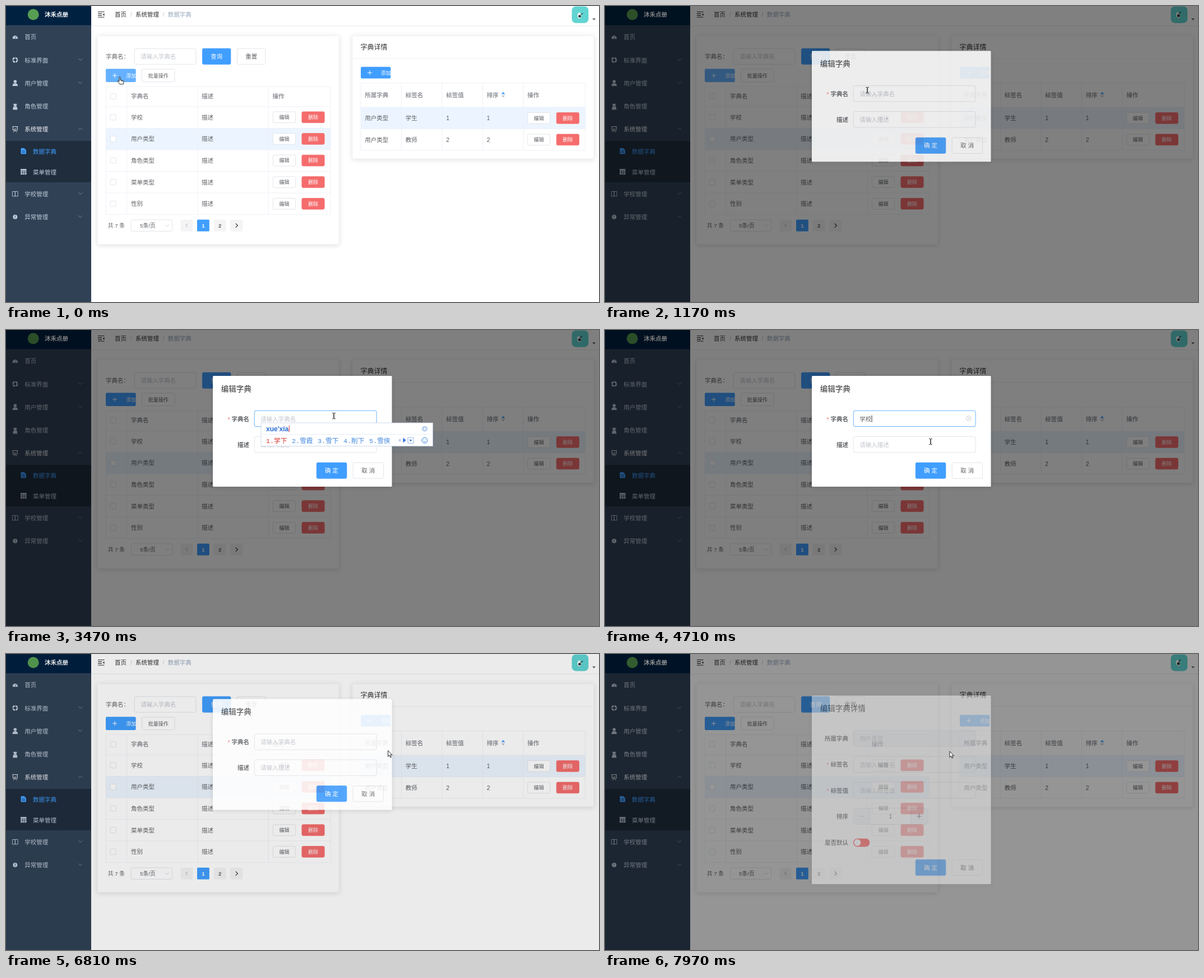
Animation, 1058 px wide and 529 px high, one loop 8 s. Source, as an HTML page:

```html
<!DOCTYPE html>
<html lang="zh-CN">
<head>
<meta charset="utf-8">
<style>
html, body { margin: 0; width: 100%; height: 100%; overflow: hidden; background: #fff; }
svg { display: block; width: 100vw; height: 100vh; }
text { font-family: "Liberation Sans", "Noto Sans CJK SC", "Noto Sans CJK", sans-serif; white-space: pre; }
</style>
</head>
<body>
<svg id="stage" viewBox="0 0 1058 529">
  <defs>
    <filter id="soft" x="-10%" y="-10%" width="120%" height="125%">
      <feDropShadow dx="0" dy="1.5" stdDeviation="4" flood-color="#000" flood-opacity=".13"/>
    </filter>
  </defs>
</svg>
<script>
const LOOP = 8000;
const BLUE = '#409eff', LIGHT = '#66b1ff', RED = '#f56c6c', LINE = '#ebeef5', EDGE = '#dcdfe6';
const INK = '#606266', DARK = '#303133', GREY = '#909399', HINT = '#c0c4cc', MENU = '#bfcbd9';

// Markup helpers; text is placed by its vertical centre.
const text = (x, cy, s, o = {}) => {
  const { size = 10.5, fill = INK, bold, mid, id, extra = '' } = o;
  return `<text x="${x}" y="${(cy + size * .375).toFixed(2)}" font-size="${size}" fill="${fill}"` +
    `${bold ? ' font-weight="700"' : ''}${mid ? ' text-anchor="middle"' : ''}${id ? ` id="${id}"` : ''} ${extra}>${s}</text>`;
};
const rect = (x, y, w, h, fill, o = {}) =>
  `<rect x="${x}" y="${y}" width="${w}" height="${h}" fill="${fill}" rx="${o.r || 0}"` +
  `${o.stroke ? ` stroke="${o.stroke}" stroke-width="${o.sw || .8}"` : ''}${o.id ? ` id="${o.id}"` : ''} ${o.extra || ''}/>`;
const path = (d, stroke, o = {}) =>
  `<path d="${d}" fill="${o.fill || 'none'}" stroke="${stroke}" stroke-width="${o.w || 1}" ${o.extra || ''}/>`;
const group = (id, body, attr = '') => `<g id="${id}" ${attr}>${body}</g>`;

const button = (x, y, w, h, label, o = {}) => {
  const { fill = '#fff', size = 9, id } = o;
  const plain = fill === '#fff';
  return rect(x + .4, y + .4, w - .8, h - .8, fill, { r: 2.3, stroke: plain ? EDGE : fill, id }) +
    text(x + w / 2, y + h / 2, label, { size, fill: plain ? INK : '#fff', mid: true, id: id && id + 'Text' });
};
const addButton = (x, y, w, h, id) =>
  rect(x, y, w, h, BLUE, { r: 2.3, id }) +
  path(`M${x + 12} ${y + h / 2}h8m-4 -4v8`, '#fff') +
  text(x + w - 30 + (w < 54 ? .5 : 0) + 18, y + h / 2, '添加', { size: 9, fill: '#fff', extra: 'text-anchor="middle" dx="3"' });
const field = (x, y, w, h, hint, o = {}) =>
  rect(x + .4, y + .4, w - .8, h - .8, o.fill || '#fff', { r: 3, stroke: EDGE, id: o.id }) +
  text(x + 11.5, y + h / 2 + .4, hint, { fill: HINT, id: o.id && o.id + 'Text' });
const rowButtons = (x, cy) =>
  button(x, cy - 10.3, 41, 20.6, '编辑') + button(x + 51.5, cy - 10.3, 41, 20.6, '删除', { fill: RED });
const chevron = (x, y, up, color = GREY) =>
  path(up ? `M${x - 3.5} ${y + 1.8}l3.5 -3.5l3.5 3.5` : `M${x - 3.5} ${y - 1.8}l3.5 3.5l3.5 -3.5`, color, { w: .8 });
const checkbox = cy => rect(186.2, cy - 5, 10, 10, '#fff', { r: 1.3, stroke: EDGE });
const grid = (xs, ys) => path(
  xs.map(x => `M${x} ${ys[0]}V${ys[ys.length - 1]}`).join('') +
  ys.map(y => `M${xs[0]} ${y}H${xs[xs.length - 1]}`).join(''), LINE, { w: .8 });

function sidebar() {
  const icons = [
    path('M11.5 59a5 5 0 1 1 9.6 0zM16 58l2-4', '#304156', { fill: MENU, w: .8 }),
    `<circle cx="16.3" cy="96.5" r="3.8" fill="none" stroke="${MENU}" stroke-width="2.6" stroke-dasharray="4.6 1.37"/>`,
    `<circle cx="16.3" cy="135" r="2.8" fill="${MENU}"/>` + path('M11.5 143q0 -5 4.8 -5t4.8 5z', 'none', { fill: MENU }),
    `<circle cx="16.3" cy="177" r="2.6" fill="${MENU}"/>` + path('M12.5 185l1 -5h5.6l1 5zM12.5 175.5h7.6', MENU, { fill: MENU, w: .8 }),
    path('M11.5 215.5h9.6M12.3 215.5v6.5h8v-6.5M13 225.5l3.3 -3l3.3 3M14 219.5l1.7 1.2l2.8 -2.7', '#f4f4f5', { w: .9 }),
    path('M27 254.5h5.5l3 3v6.5h-8.5z', BLUE, { fill: BLUE }) + path('M28.5 259h5.5m-5.5 2.5h5.5', '#1f2d3d', { w: .8 }),
    rect(26, 291.3, 10.5, 10, MENU) + path('M26 294.8h10.5m-10.5 3.2h10.5M29.5 295v6.3m3.5 -6.3v6.3', '#1f2d3d', { w: .8 }),
    path('M11.5 331.5h4.8v8.5h-4.8zM16.3 331.5h4.8v8.5h-4.8z', MENU, { w: .9 }),
    `<circle cx="16.3" cy="377" r="4" fill="${MENU}"/>` + path('M16.3 374.5v3m0 1v1', '#304156')
  ];
  const items = [['首页', 55.3], ['标准界面', 96.7, 1], ['用户管理', 138, 1], ['角色管理', 179.3], ['系统管理', 220.5, 2],
    ['数据字典', 259.8], ['菜单管理', 296.7], ['学校管理', 336, 1], ['异常管理', 377.3, 1]];
  return rect(0, 0, 152, 529, '#304156') + rect(0, 0, 152, 34.3, '#002140') + rect(0, 241, 152, 74, '#1f2d3d') +
    '<circle cx="48.7" cy="15.3" r="10" fill="#579d52"/>' +
    text(69, 15.3, '沐禾点册', { fill: '#fff', bold: true }) + icons.join('') +
    items.map(([s, y, arrow], i) =>
      text(i === 5 || i === 6 ? 48 : 33.3, y, s, { fill: i === 4 ? '#f4f4f5' : i === 5 ? BLUE : MENU }) +
      (arrow ? chevron(132.7, y - 1, arrow === 2) : '')).join('');
}

function topbar() {
  return rect(152, 35, 906, 1, '#ebecef') +
    path('M164 10.5h11.5m-11.5 3.2h7m-7 3.2h7m-7 3.1h11.5', DARK, { w: 1.2 }) + path('M175.5 13l-3 2.3l3 2.3z', 'none', { fill: DARK }) +
    text(194, 15.3, '首页', { fill: DARK }) + text(222, 15.3, '/', { fill: HINT }) +
    text(231, 15.3, '系统管理', { fill: DARK }) + text(279.5, 15.3, '/', { fill: HINT }) +
    text(288.7, 15.3, '数据字典', { fill: '#97a8be' }) +
    rect(1009.5, .7, 29.7, 29.7, '#61d5d2', { r: 7 }) +
    group('pet', '<ellipse cx="1023" cy="17" rx="3.4" ry="5.4" fill="#f4f8f6"/><circle cx="1023.5" cy="18.3" r="2.4" fill="#26343a"/>' +
      path('M1025 15.5l4.5 -2.5', '#26343a', { w: 1.3 })) +
    path('M1046 22.3h6l-3 3.2z', 'none', { fill: '#5a5e66' });
}

function leftCard() {
  const ys = [144, 180, 218.5, 257, 295.5, 334, 372.7], xs = [178.3, 215.5, 342, 468.3, 579];
  const names = ['学校', '用户类型', '角色类型', '菜单类型', '性别'];
  const head = { fill: GREY, bold: true };
  return rect(163, 53.3, 431, 372.7, '#fff', { r: 2, stroke: LINE, extra: 'filter="url(#soft)"' }) +
    text(178, 90, '字典名：') + field(228.7, 75.6, 110.6, 29, '请输入字典名') +
    button(350, 75.6, 51.3, 29, '查询', { fill: BLUE, size: 10.5 }) + button(412, 75.6, 51.3, 29, '重置', { size: 10.5 }) +
    addButton(178, 112.3, 53.7, 23.7, 'addLeft') + button(242, 112.3, 59.3, 23.7, '批量操作') +
    rect(178.3, 218.5, 400.7, 38.5, '#ecf5ff') + grid(xs, ys) + checkbox(161.3) +
    text(223, 161.3, '字典名', head) + text(349, 161.3, '描述', head) + text(475.5, 161.3, '操作', head) +
    names.map((s, i) => {
      const y = 198.8 + i * 38.65;
      return checkbox(y) + text(223, y, s) + text(349, y, '描述') + rowButtons(476, y);
    }).join('') +
    text(181.7, 392.3, '共 7 条', { size: 9.75 }) +
    rect(223.2, 382, 73.5, 20.5, '#fff', { r: 2.3, stroke: EDGE }) + text(239, 392.3, '5条/页', { size: 9.75 }) + chevron(287.5, 392.3, false, HINT) +
    [311.5, 341, 370.7, 400.3].map((x, i) => rect(x, 381.7, 21.8, 21, i === 1 ? BLUE : '#f4f4f5', { r: 1.5 })).join('') +
    text(351.9, 392.3, '1', { size: 9.75, fill: '#fff', bold: true, mid: true }) +
    text(381.6, 392.3, '2', { size: 9.75, bold: true, mid: true }) +
    path('M324 389l-3.3 3.3l3.3 3.3', HINT, { w: 1.1 }) + path('M409.7 388.7l3.6 3.6l-3.6 3.6', DARK, { w: 1.2 });
}

function rightCard() {
  const xs = [633, 705.5, 778, 850.5, 923, 1033.5], heads = ['所属字典', '标签名', '标签值', '排序', '操作'];
  const rows = [['用户类型', '学生', '1', '1'], ['用户类型', '教师', '2', '2']];
  return rect(618, 53.3, 431, 219.7, '#fff', { r: 2, stroke: LINE, extra: 'filter="url(#soft)"' }) +
    text(632.5, 73.7, '字典详情', { size: 12, fill: DARK }) + rect(618, 93.5, 431, .8, LINE) +
    addButton(633, 108.8, 53.3, 20.7, 'addRight') +
    rect(633, 181, 400.5, 38.5, '#ecf5ff') + grid(xs, [137.5, 181, 219.5, 258]) +
    heads.map((s, i) => text(xs[i] + 7.3, 159.3, s, { fill: GREY, bold: true })).join('') +
    path('M883.5 157.5h7l-3.5 -3.8z', 'none', { fill: BLUE }) + path('M883.5 159.7h7l-3.5 3.8z', 'none', { fill: HINT }) +
    rows.map((row, r) => row.map((s, i) => text(xs[i] + 7.3, 200.3 + r * 38.6, s)).join('') + rowButtons(930.3, 200.3 + r * 38.6)).join('');
}

const label = (cy, s, need) => {
  const x = 434 - s.length * 10.5;
  return text(x, cy, s, { bold: true }) + (need ? text(x - 7, cy + 1, '*', { fill: RED }) : '');
};
const frame = (h, title, okY, id) =>
  rect(369, 82, 319.5, h, '#fff', { r: 1.5, extra: 'filter="url(#soft)"' }) +
  text(383.7, 104.7, title, { size: 13.5, fill: DARK }) +
  button(553.8, okY, 54.5, 29, '确 定', { fill: BLUE, size: 10.5, id: id + 'Ok' }) +
  button(618.8, okY, 55, 29, '取 消', { size: 10.5, id: id + 'No' });
const clearIcon = (id, y) => group(id, `<circle cx="648.8" cy="${y}" r="4.3" fill="none" stroke="${HINT}" stroke-width=".9"/>` +
  path(`M647.2 ${y - 1.6}l3.2 3.2m0 -3.2l-3.2 3.2`, HINT, { w: .9 }));

function editDialog() {
  return frame(198, '编辑字典', 236.7, 'edit') +
    label(158.7, '字典名', true) + field(442.8, 143.7, 218.7, 29.3, '请输入字典名', { id: 'name' }) + clearIcon('nameClear', 158) +
    text(443, 181.3, '字典名学校已存在', { size: 9, fill: RED, id: 'error' }) +
    label(204.7, '描述') + field(442.8, 190, 218.7, 29.3, '请输入描述', { id: 'desc' }) + clearIcon('descClear', 204.5) +
    rect(0, 0, .9, 12, '#222', { id: 'caret' });
}

function detailDialog() {
  return frame(337, '编辑字典详情', 375, 'detail') +
    label(159, '所属字典') + field(442.8, 144, 218.7, 29.3, '用户类型', { fill: '#f5f7fa' }) +
    label(205.2, '标签名', true) + field(442.8, 190.5, 218.7, 29.3, '请输入标签名') +
    label(251.4, '标签值', true) + field(442.8, 236.8, 218.7, 29.3, '请输入标签值') +
    label(297.8, '排序') + rect(443.2, 283.3, 132.5, 29, '#fff', { r: 3, stroke: EDGE }) +
    rect(443.6, 283.7, 29.5, 28.2, '#f5f7fa') + rect(545.5, 283.7, 29.8, 28.2, '#f5f7fa') +
    path('M473.2 283.5v28.6M545.5 283.5v28.6', EDGE, { w: .8 }) +
    path('M454 297.8h8', HINT) + path('M556.3 297.8h8.4m-4.2 -4.2v8.4', INK) + text(509.3, 297.8, '1', { mid: true }) +
    label(344.6, '是否默认') + rect(442.8, 337.5, 29.6, 14.8, '#ff4949', { r: 7.4 }) + '<circle cx="450.3" cy="344.9" r="6" fill="#fff"/>';
}

function imePanel() {
  return rect(455, 166, 306.5, 41.5, '#fff', { stroke: '#c5d3e6' }) + rect(455.4, 186, 305.7, .8, '#e4eaf2') +
    text(464, 176.5, '', { size: 12, fill: '#2a6fd6', bold: true, id: 'pinyin' }) +
    rect(0, 170.5, 1, 12, '#d33', { id: 'imeCaret' }) +
    `<circle cx="747" cy="176.5" r="3.2" fill="none" stroke="#a9c6ee" stroke-width="2"/>` +
    `<circle cx="747" cy="176.5" r="4.6" fill="none" stroke="#a9c6ee" stroke-width="1.3" stroke-dasharray="1.8 1.81"/>` +
    [0, 1, 2, 3, 4].map(i => text(464 + i * 46, 197.3, '', { size: 11.7, fill: i ? '#3f86dd' : '#d9302c', id: 'word' + i, extra: 'font-weight="300" style="font-family:\'Liberation Mono\',\'Noto Sans CJK SC\',monospace"' })).join('') +
    path('M704 193.5v7l-4 -3.5z', 'none', { fill: '#b8cdea' }) + path('M708.5 192.5v9l5 -4.5z', 'none', { fill: '#2a6fd6' }) +
    rect(717, 192.3, 10, 10, '#fff', { stroke: '#7fabe6' }) + path('M719.5 196h5l-2.5 3z', 'none', { fill: '#2a6fd6' }) +
    '<circle cx="747" cy="197.3" r="5" fill="none" stroke="#3f86dd"/>' + path('M744.3 198.5q2.7 3 5.4 0M745 195v1.4m4 -1.4v1.4', '#3f86dd', { w: .9 });
}

const pointers =
  group('hand', path('M-1 .8q1 -1.3 2 0v5l5 1.2q1.2 .5 1 2l-.8 4.3h-6.2l-3.5 -5q-.3 -1.7 1.2 -1l1.3 1.2z', '#111', { fill: '#fff', w: .9 }) + path('M3 6.3v2m2 -1.5v1.8', '#111', { w: .7 })) +
  group('beam', path('M-2.8 -5.3q2.8 0 2.8 1.2v8.2q0 1.2 -2.8 1.2M2.8 -5.3q-2.8 0 -2.8 1.2v8.2q0 1.2 2.8 1.2', '#222', { w: 1 })) +
  group('arrow', path('M0 0v10.5l2.4 -2.2l1.8 4l1.7 -.8l-1.8 -3.8h3.4z', '#111', { fill: '#fff', w: .9 }));

const stage = document.getElementById('stage');
stage.insertAdjacentHTML('beforeend',
  rect(0, 0, 1058, 529, '#fff') + leftCard() + rightCard() + topbar() + sidebar() +
  rect(0, 0, 1058, 529, '#000', { id: 'shade' }) +
  group('edit', editDialog()) + group('detail', detailDialog()) + group('ime', imePanel()) + group('pointer', pointers));

const el = {};
stage.querySelectorAll('[id]').forEach(n => el[n.id] = n);
const set = (id, attrs) => { for (const k in attrs) el[id].setAttribute(k, attrs[k]); };
const show = (id, on) => set(id, { visibility: on ? 'inherit' : 'hidden' });
const clamp = v => Math.min(1, Math.max(0, v));
const within = (t, a, b) => t >= a && t < b;

// CSS "ease": cubic-bezier(.25, .1, .25, 1)
function ease(x) {
  x = clamp(x);
  if (x === 0 || x === 1) return x;
  const bez = (a, b, s) => 3 * a * s * (1 - s) ** 2 + 3 * b * s * s * (1 - s) + s ** 3;
  let lo = 0, hi = 1;
  for (let i = 0; i < 20; i++) {
    const m = (lo + hi) / 2;
    if (bez(.25, .25, m) < x) lo = m; else hi = m;
  }
  return bez(.1, 1, lo);
}

const route = [[0, 203, 126.5], [1000, 203, 126.5], [1165, 468, 150.5], [1500, 540, 155], [1900, 585, 153.5], [4400, 585, 153.5],
  [4680, 581, 199.5], [5400, 581, 199.5], [5800, 608, 249.5], [6250, 608, 249.5], [6480, 642, 250], [6740, 642, 250],
  [6890, 728, 82], [7050, 728, 82], [7400, 662, 118], [7860, 662, 118], [7970, 615, 174], [8000, 612, 180]];
const shapes = [[0, 'hand'], [1050, 'arrow'], [1150, 'beam'], [5480, 'arrow'], [5620, 'hand'], [6790, 'arrow'], [7370, 'hand'], [7890, 'arrow']];
const typing = [
  [2250, 'x', '下 想 小 写 向'], [2420, 'xu', '需 许 续 须 徐'], [2600, 'xue', '学 雪 血 穴 靴'],
  [3000, "xue'x", '学习 学校 学下 雪下 血型'], [3200, "xue'xi", '学习 学戏 血洗 雪戏 血系'],
  [3400, "xue'xia", '学下 雪霞 雪下 削下 雪侠'], [3550, "xue'xiao", '学校 学小 雪消 血小 雪笑']];
const latest = (list, t) => list.filter(k => k[0] <= t).pop();

function placeDialog(id, p) {
  show(id, p > 0);
  set(id, { transform: `translate(0 ${(20 * (p - 1)).toFixed(2)})`, opacity: (p ** 1.6).toFixed(3) });
}

function render(t) {
  const closing = t >= 6785;
  placeDialog('edit', closing ? 1 - ease((t - 6785) / 300) : ease((t - 980) / 300));
  placeDialog('detail', ease((t - 7865) / 300));
  const dim = t < 6730 ? ease((t - 980) / 200) : t < 7865 ? 1 - ease((t - 6730) / 150) : ease((t - 7865) / 200);
  set('shade', { opacity: (dim * .5).toFixed(3) });

  set('addLeft', { fill: within(t, 830, 950) ? '#3a8ee6' : t < 1900 ? LIGHT : BLUE });
  set('addRight', { fill: t >= 7370 ? LIGHT : BLUE });

  const onName = within(t, 1900, 4930), onDesc = within(t, 4930, 5930);
  const named = within(t, 4000, 6785), described = within(t, 5320, 6785), bad = within(t, 5050, 6785);
  set('name', { stroke: bad ? RED : onName ? BLUE : EDGE });
  set('desc', { stroke: onDesc ? BLUE : EDGE });
  set('nameText', { fill: named ? INK : HINT });
  set('descText', { fill: described ? INK : HINT });
  el.nameText.textContent = named ? '学校' : '请输入字典名';
  el.descText.textContent = described ? '1' : '请输入描述';
  show('error', bad);
  show('nameClear', named && onName);
  show('descClear', described && onDesc);

  const ime = within(t, 2250, 4000);
  const blink = (t - 4000) % 1060 < 530 || within(t, 4600, 4800);
  show('caret', !ime && (onName || onDesc) && blink);
  set('caret', onName ? { x: named ? 475.6 : 454.4, y: 152.5 } : { x: described ? 460.4 : 454.4, y: 198.7 });

  show('ime', ime);
  if (ime) {
    const [, keys, words] = latest(typing, t);
    el.pinyin.textContent = keys;
    set('imeCaret', { x: 464.5 + el.pinyin.getComputedTextLength() });
    words.split(' ').forEach((w, i) => el['word' + i].textContent = `${i + 1}.${w}`);
  }

  const okHot = within(t, 5650, 6420), noHot = within(t, 6400, 6785);
  set('editOk', { fill: okHot ? LIGHT : BLUE, stroke: okHot ? LIGHT : BLUE });
  set('editNo', { fill: noHot ? '#ecf5ff' : '#fff', stroke: noHot ? '#c6e2ff' : EDGE });
  set('editNoText', { fill: noHot ? BLUE : INK });

  const i = Math.max(1, route.findIndex(k => k[0] > t));
  const [t0, x0, y0] = route[i - 1], [t1, x1, y1] = route[i];
  const u = (t - t0) / (t1 - t0), s = u * u * (3 - 2 * u);
  set('pointer', { transform: `translate(${(x0 + (x1 - x0) * s).toFixed(2)} ${(y0 + (y1 - y0) * s).toFixed(2)})` });
  const shape = latest(shapes, t)[1];
  ['hand', 'beam', 'arrow'].forEach(id => show(id, id === shape));

  const sway = Math.sin(t / 620 * 2 * Math.PI);
  set('pet', { transform: `rotate(${(sway * 28).toFixed(1)} 1023.5 18) translate(0 ${(-Math.abs(sway) * 1.5).toFixed(2)})` });
}

const start = performance.now();
function tick() {
  render((performance.now() - start) % LOOP);
  requestAnimationFrame(tick);
}
tick();
</script>
</body>
</html>
```
